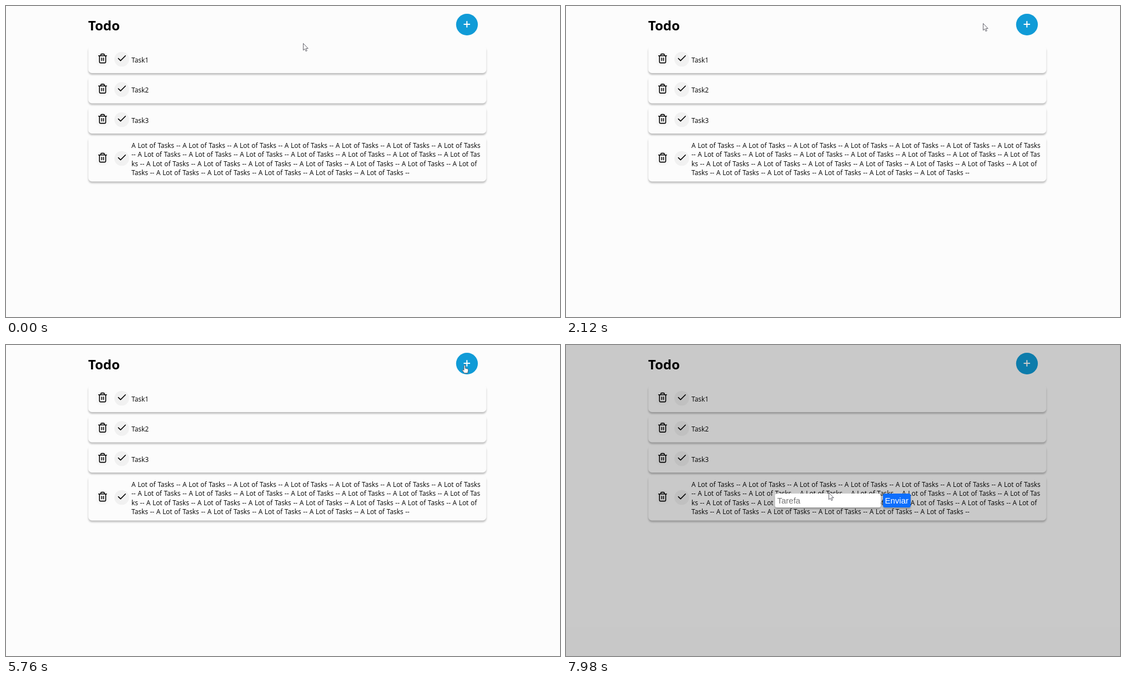
An HTML page that plays this animation: 998x561 px, repeating every 8 s.

```html
<!DOCTYPE html>
<html lang="en">
<head>
<meta charset="utf-8">
<title>Todo</title>
<style>
  html, body { margin: 0; height: 100%; overflow: hidden; background: #fcfcfc; }
  svg { display: block; width: 100%; height: 100%; }
  text { font: 11.9px "Open Sans", "Noto Sans", sans-serif; word-spacing: .55px; white-space: pre; }
  .title { font-size: 24px; font-weight: 700; }
  .field text { font: 15px "Liberation Sans", Arial, sans-serif; }
  .raised { filter: drop-shadow(0 3px 1.7px rgba(0, 0, 0, .24)); }
  .icon { fill: none; stroke: #000; stroke-width: 2; stroke-linecap: round; stroke-linejoin: round; }
  #arrow, #hand { fill: #fff; stroke: #50505a; stroke-width: .9; stroke-linejoin: round; }
</style>
</head>
<body>
<svg viewBox="0 0 998 561">
  <defs>
    <path id="trash" class="icon" d="M3 6H21M5 6V20Q5 22 7 22H17Q19 22 19 20V6M8 6V4Q8 2 10 2H14Q16 2 16 4V6M10 11V17M14 11V17"/>
    <path id="check" class="icon" d="M20 6L9 17L4 12"/>
  </defs>
  <rect width="998" height="561" fill="#fcfcfc"/>
  <text class="title" x="148" y="43.8">Todo</text>
  <circle cx="830.4" cy="33.5" r="19.6" fill="#109bd7"/>
  <path d="M824.5 33H836M830.3 27.3V38.7" stroke="#fff" stroke-width="2"/>
  <g id="list"></g>
  <g id="modal">
    <rect width="998" height="561" fill="#000" fill-opacity=".205"/>
    <g class="field">
      <rect class="raised" x="376.5" y="268" width="190.5" height="25" rx="3.5" fill="#fff"/>
      <rect class="raised" x="571" y="268" width="50" height="25" rx="3.5" fill="#0d6efd"/>
      <text x="380.5" y="286" fill="#757575">Tarefa</text>
      <text x="574.5" y="286" fill="#fff">Enviar</text>
    </g>
  </g>
  <g id="cursor">
    <path id="arrow" d="M.5 .5V12.8L3.3 10.3L5.2 14.6L7.2 13.7L5.3 9.6H9.2Z"/>
    <path id="hand" d="M3 1.6Q3 .2 4.1 .2T5.3 1.6V6L9.4 7Q11.2 7.6 10.8 9.6L9.7 14.7H3.7L.4 10.2Q-.3 8.8 1 8.3L3 9.6Z"/>
  </g>
</svg>
<script>
const $ = id => document.getElementById(id);

const unit = "A Lot of Tasks -- ";
const longTask = [
  unit.repeat(6) + "A Lot of Tasks",
  "-- " + unit.repeat(6) + "A Lot of Tas",
  "ks -- " + unit.repeat(6) + "A Lot of",
  "Tasks -- " + unit.repeat(5)
];

function card(y, height, iconY, lines, baseline) {
  const icon = (name, x) =>
    `<use href="#${name}" transform="translate(${x - 9.6} ${iconY - 9.6}) scale(.8)"/>`;
  const text = lines.map((line, i) =>
    `<text x="226" y="${baseline + i * 16.5}">${line}</text>`).join("");
  return `<rect class="raised" x="148.3" y="${y}" width="717" height="${height}" rx="6.5" fill="#fcfcfc"/>
    <circle cx="174" cy="${iconY + 1.4}" r="13.3" fill="#f8f8f8"/>
    <circle cx="208.5" cy="${iconY + 1.4}" r="13.3" fill="#f1f1f1"/>
    ${icon("trash", 174)}${icon("check", 208.8)}${text}`;
}

$("list").innerHTML = [0, 1, 2].map(i =>
  card(72 + i * 54.5, 49, 94.6 + i * 54.5, ["Task" + (i + 1)], 101.5 + i * 54.5)
).join("") + card(235.5, 81, 273.6, longTask, 255.7);

// Pointer stops: time, x, y
const stops = [
  [400, 535, 67], [1100, 702, 31], [2120, 751, 31], [2820, 804, 41],
  [3300, 822, 36], [6159, 822, 36], [6160, 826, 36], [6400, 826, 36], [7500, 473, 266]
];

function pointer(t) {
  const next = stops.findIndex(s => s[0] > t);
  if (next === 0) return stops[0].slice(1);
  if (next < 0) return stops[stops.length - 1].slice(1);
  const [t0, x0, y0] = stops[next - 1], [t1, x1, y1] = stops[next];
  const p = (t - t0) / (t1 - t0), e = p * p * (3 - 2 * p);
  return [x0 + (x1 - x0) * e, y0 + (y1 - y0) * e];
}

function draw(now) {
  const t = now % 8000, open = t >= 6160;
  const [x, y] = pointer(t);
  const over = !open && Math.hypot(x - 830, y - 33.5) < 19.5;
  $("modal").style.display = open ? "" : "none";
  $("arrow").style.display = over ? "none" : "";
  $("hand").style.display = over ? "" : "none";
  $("cursor").setAttribute("transform", `translate(${x} ${y})`);
  requestAnimationFrame(draw);
}
draw(0);
</script>
</body>
</html>
```
